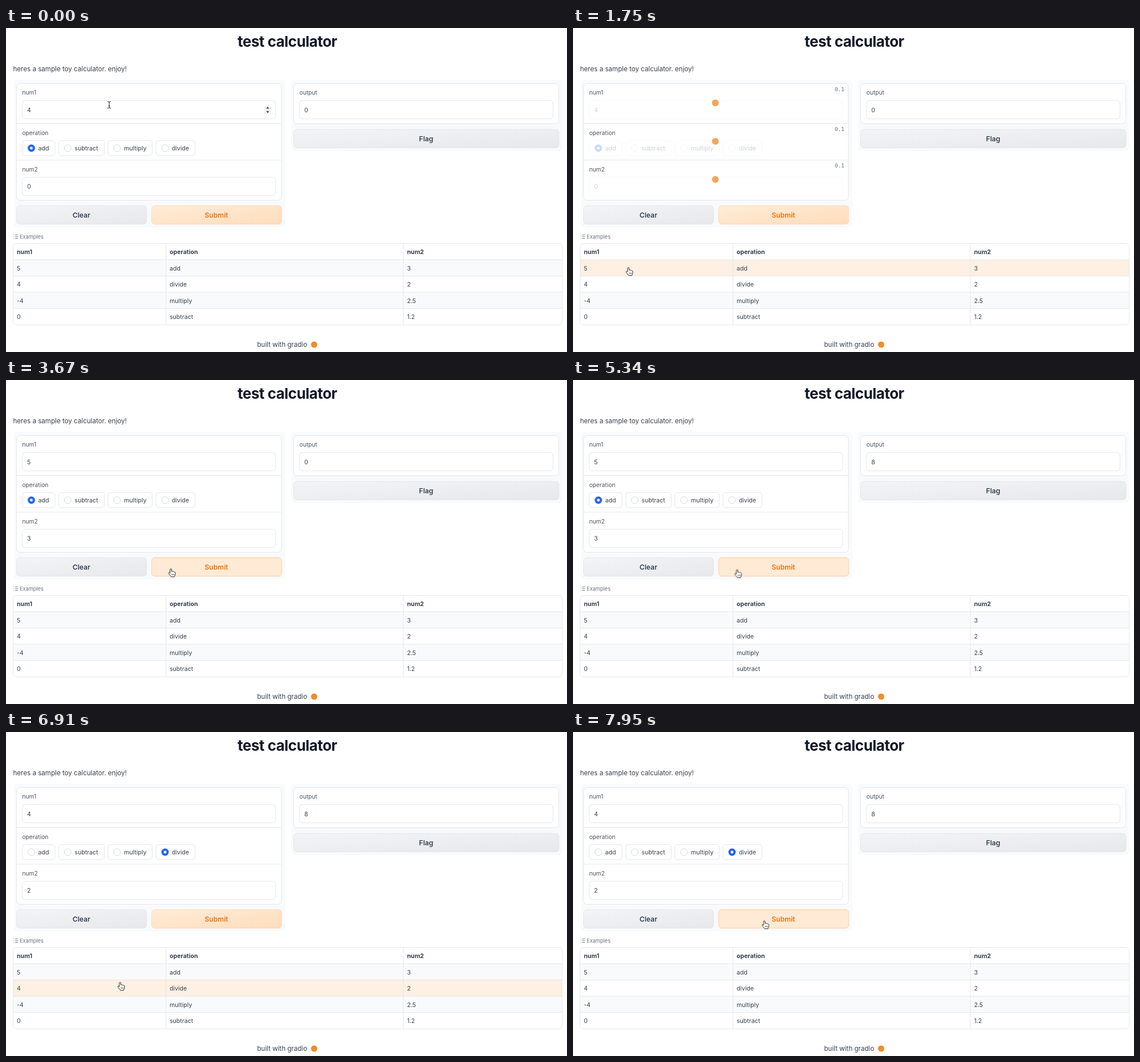
An HTML page that plays this animation: 984 px wide and 569 px high, repeating every 8000 ms.

```html
<!DOCTYPE html>
<html lang="en">
<head>
<meta charset="utf-8">
<title>test calculator</title>
<style>
  @property --tenths { syntax: "<integer>"; inherits: true; initial-value: 0; }

  html, body { margin: 0; width: 100%; height: 100%; overflow: hidden; background: #fff; }
  svg { position: absolute; left: 0; top: 0; display: block; }
  text { font: 10.6px Inter, sans-serif; fill: #374151; }
  .title { font-size: 26px; font-weight: 700; letter-spacing: -.02em; fill: #111827; text-anchor: middle; }
  .intro { font-size: 11.6px; }
  .label text { font-size: 10.2px; fill: #4b5563; }
  .head text { font-weight: 700; }
  .small { font-size: 9.2px; fill: #6b7280; }
  .button { font-size: 12.1px; font-weight: 600; text-anchor: middle; }
  .box { fill: #fff; stroke: #e5e7eb; }
  .line { fill: none; stroke: #e5e7eb; }
  .panel { fill: #f9fafb; }
  .stripe { fill: #f9fafb; }
  .hover { fill: #fef0e2; }
  .mark { fill: #f28c28; }
  .cover { fill: #fff; }

  /* One percent of the loop is 80 ms. */
  .values-a, .values-b, .values-c, .radio-early, .radio-late, .result-a, .result-b,
  .row-1, .row-2, .submit-hover, .stepper, .ibeam, .arrow, .hand {
    animation: 8s step-end infinite;
  }
  .values-a { animation-name: values-a; }
  .values-b { animation-name: values-b; }
  .values-c { animation-name: values-c; }
  .radio-early { animation-name: radio-early; }
  .radio-late { animation-name: values-c; }
  .result-a { animation-name: result-a; }
  .result-b { animation-name: result-b; }
  .row-1 { animation-name: row-1; }
  .row-2 { animation-name: row-2; }
  .submit-hover { animation-name: submit-hover; }
  .stepper, .ibeam { animation-name: in-field; }
  .arrow { animation-name: arrow; }
  .hand { animation-name: hand; }

  @keyframes values-a { 0% { opacity: 1 } 27.4% { opacity: 0 } }
  @keyframes values-b { 0% { opacity: 0 } 27.4% { opacity: 1 } 83.8% { opacity: 0 } }
  @keyframes values-c { 0% { opacity: 0 } 83.8% { opacity: 1 } }
  @keyframes radio-early { 0% { opacity: 1 } 83.8% { opacity: 0 } }
  @keyframes result-a { 0% { opacity: 1 } 52.8% { opacity: 0 } }
  @keyframes result-b { 0% { opacity: 0 } 52.8% { opacity: 1 } }
  @keyframes row-1 {
    0% { opacity: 0 } 6.3% { opacity: 1 } 24.5% { opacity: 0 }
    69.2% { opacity: 1 } 70.2% { opacity: 0 } 87.8% { opacity: 1 } 88.8% { opacity: 0 }
  }
  @keyframes row-2 { 0% { opacity: 0 } 70.2% { opacity: 1 } 87.8% { opacity: 0 } }
  @keyframes submit-hover {
    0% { opacity: 0 } 35.6% { opacity: 1 } 67.8% { opacity: 0 } 92.5% { opacity: 1 }
  }
  @keyframes in-field { 0% { opacity: 1 } 2.8% { opacity: 0 } }
  @keyframes arrow {
    0% { opacity: 0 } 2.8% { opacity: 1 } 6.3% { opacity: 0 }
    24.5% { opacity: 1 } 35.6% { opacity: 0 }
    67.8% { opacity: 1 } 69.2% { opacity: 0 }
    88.8% { opacity: 1 } 92.5% { opacity: 0 }
  }
  @keyframes hand {
    0% { opacity: 0 } 6.3% { opacity: 1 } 24.5% { opacity: 0 }
    35.6% { opacity: 1 } 67.8% { opacity: 0 }
    69.2% { opacity: 1 } 88.8% { opacity: 0 } 92.5% { opacity: 1 }
  }

  .pointer { animation: pointer 8s ease-in-out infinite; }
  @keyframes pointer {
    0%, 1.5% { transform: translate(181px, 135px) }
    7.7%, 20.9% { transform: translate(94px, 422.5px) }
    26.8%, 31% { transform: translate(145px, 397px) }
    37.6%, 45.6% { transform: translate(288px, 331.5px) }
    45.8%, 66.4% { transform: translate(289px, 332px) }
    70.6%, 71.5% { transform: translate(195.5px, 437.5px) }
    73.4%, 87.2% { transform: translate(200px, 440px); animation-timing-function: ease-in }
    89.4% { transform: translate(272px, 385px); animation-timing-function: ease-out }
    95.2%, 99.2% { transform: translate(334.5px, 331.5px) }
    99.3%, 100% { transform: translate(335.5px, 332px) }
  }

  .load-in { animation: load-in 8s linear infinite; }
  .load-out { animation: load-out 8s linear infinite; }
  @keyframes load-in {
    0%, 20.6% { opacity: 0 } 22.3%, 27.4% { opacity: 1 } 29.3% { opacity: 0 }
    79.1% { opacity: 0 } 80.8%, 83.8% { opacity: 1 } 85.6%, 100% { opacity: 0 }
  }
  @keyframes load-out {
    0%, 47.6% { opacity: 0 } 49.4%, 52.8% { opacity: 1 } 54.6%, 100% { opacity: 0 }
  }

  .timer {
    position: absolute; width: 30px; line-height: 12px; text-align: right;
    font-family: "DejaVu Sans Mono", monospace; font-size: 9.4px; color: #374151;
    counter-reset: tenths var(--tenths);
  }
  .timer::before { content: "0." counter(tenths); }
  .timer.load-in { left: 446px; animation: load-in 8s linear infinite, count-in 8s linear infinite; }
  .timer.load-out { left: 932px; animation: load-out 8s linear infinite, count-out 8s linear infinite; }
  @keyframes count-in {
    0%, 20.6% { --tenths: 0 } 26.8%, 79% { --tenths: 5 }
    79.1% { --tenths: 0 } 84.1%, 100% { --tenths: 4 }
  }
  @keyframes count-out { 0%, 47.6% { --tenths: 0 } 52.6%, 100% { --tenths: 4 } }
</style>
</head>
<body>
<svg width="984" height="569" viewBox="0 0 984 569">
  <defs>
    <linearGradient id="gray" x2="1" y2="1"><stop stop-color="#f3f4f6"/><stop offset="1" stop-color="#e6e8eb"/></linearGradient>
    <linearGradient id="orange" x2="1" y2="1"><stop stop-color="#ffedd8"/><stop offset="1" stop-color="#fedcbb"/></linearGradient>
    <clipPath id="table"><rect x="12.5" y="378.5" width="963" height="143" rx="6"/></clipPath>
    <g id="radio"><circle r="6" fill="#fff" stroke="#d5d9df"/></g>
    <g id="checked"><circle r="6.4" fill="#2563eb"/><circle r="2.4" fill="#fff"/></g>
  </defs>

  <text class="title" x="493.5" y="33">test calculator</text>
  <text class="intro" x="12.5" y="75.5">heres a sample toy calculator. enjoy!</text>

  <rect class="panel" x="14" y="91" width="476" height="259" rx="6"/>
  <rect class="panel" x="500" y="91" width="476" height="125" rx="6"/>

  <!-- inputs -->
  <rect class="box" x="18.5" y="97.5" width="464.5" height="205" rx="6"/>
  <path class="line" d="M18.5 167.5H483M18.5 232H483"/>
  <rect class="box" x="28.5" y="127.5" width="444.5" height="32" rx="5.5"/>
  <rect class="box" x="28.5" y="262" width="444.5" height="32" rx="5.5"/>
  <g class="stepper">
    <rect x="453" y="136.5" width="12" height="14.5" rx="2" fill="#f1f1f1"/>
    <path d="M456.3 141.5L459 138.3L461.7 141.5ZM456.3 146L459 149.2L461.7 146Z" fill="#444"/>
  </g>
  <text class="values-a" x="37" y="147.5">4</text>
  <text class="values-b" x="37" y="147.5">5</text>
  <text class="values-c" x="37" y="147.5">4</text>
  <text class="values-a" x="37" y="282">0</text>
  <text class="values-b" x="37" y="282">3</text>
  <text class="values-c" x="37" y="282">2</text>

  <rect class="box" x="28.5" y="197.5" width="57.5" height="26.5" rx="5"/>
  <rect class="box" x="92.5" y="197.5" width="80" height="26.5" rx="5"/>
  <rect class="box" x="178.5" y="197.5" width="78" height="26.5" rx="5"/>
  <rect class="box" x="263" y="197.5" width="68.5" height="26.5" rx="5"/>
  <use href="#radio" x="44.5" y="211"/>
  <use href="#radio" x="108.3" y="211"/>
  <use href="#radio" x="194.7" y="211"/>
  <use href="#radio" x="279" y="211"/>
  <use class="radio-early" href="#checked" x="44.5" y="211"/>
  <use class="radio-late" href="#checked" x="279" y="211"/>
  <text x="56.5" y="214.7">add</text>
  <text x="120.3" y="214.7">subtract</text>
  <text x="207" y="214.7">multiply</text>
  <text x="291" y="214.7">divide</text>

  <g class="load-in">
    <rect class="cover" x="20" y="99" width="461.5" height="67.5"/>
    <rect class="cover" x="20" y="168.5" width="461.5" height="62.5"/>
    <rect class="cover" x="20" y="233" width="461.5" height="68"/>
    <circle class="mark" cx="249.7" cy="131.5" r="6"/>
    <circle class="mark" cx="249.7" cy="199" r="6"/>
    <circle class="mark" cx="249.7" cy="266" r="6"/>
  </g>

  <rect x="18.5" y="312" width="228" height="32.5" rx="5.5" fill="url(#gray)" stroke="#e5e7eb"/>
  <text class="button" x="132.3" y="332.5">Clear</text>
  <rect x="255.5" y="312" width="228" height="32.5" rx="5.5" fill="url(#orange)" stroke="#fedbb5"/>
  <rect class="submit-hover" x="255.5" y="312" width="228" height="32.5" rx="5.5" fill="#feead5" stroke="#fdd3a6"/>
  <text class="button" x="369" y="332.5" style="fill:#e17716">Submit</text>

  <!-- output -->
  <rect class="box" x="504.5" y="97.5" width="465" height="70.5" rx="6"/>
  <rect class="box" x="514.5" y="127.5" width="445" height="32" rx="5.5"/>
  <text class="result-a" x="523.3" y="147.5">0</text>
  <text class="result-b" x="523.3" y="147.5">8</text>
  <g class="load-out">
    <rect class="cover" x="506" y="99" width="462" height="67.5"/>
    <circle class="mark" cx="737" cy="131.5" r="6"/>
  </g>
  <rect x="504.5" y="178" width="465.5" height="32.5" rx="5.5" fill="url(#gray)" stroke="#e5e7eb"/>
  <text class="button" x="737" y="198.5">Flag</text>

  <g class="label">
    <text x="28.5" y="117.3">num1</text>
    <text x="28.5" y="187.5">operation</text>
    <text x="28.5" y="251.5">num2</text>
    <text x="514.8" y="117.3">output</text>
  </g>

  <!-- examples -->
  <path d="M13.5 363.5h1M16 363.5h5M13.5 366.5h1M16 366.5h5M13.5 369.5h1M16 369.5h5" stroke="#6b7280" stroke-width=".9"/>
  <text class="small" x="24" y="369.7">Examples</text>
  <g clip-path="url(#table)">
    <rect class="stripe" x="12" y="407" width="964" height="28.5"/>
    <rect class="stripe" x="12" y="464" width="964" height="28.5"/>
    <rect class="hover row-1" x="12" y="407" width="964" height="28.5"/>
    <rect class="hover row-2" x="12" y="435.5" width="964" height="28.5"/>
  </g>
  <path class="line" d="M12.5 407H975.5M12.5 435.5H975.5M12.5 464H975.5M12.5 492.5H975.5M280.5 378.5V521.5M697 378.5V521.5"/>
  <rect class="line" x="12.5" y="378.5" width="963" height="143" rx="6"/>
  <g class="head"><text x="19" y="396.8">num1</text><text x="287" y="396.8">operation</text><text x="703.5" y="396.8">num2</text></g>
  <text x="19" y="425.5">5</text><text x="287" y="425.5">add</text><text x="703.5" y="425.5">3</text>
  <text x="19" y="454">4</text><text x="287" y="454">divide</text><text x="703.5" y="454">2</text>
  <text x="19" y="482.5">-4</text><text x="287" y="482.5">multiply</text><text x="703.5" y="482.5">2.5</text>
  <text x="19" y="511">0</text><text x="287" y="511">subtract</text><text x="703.5" y="511">1.2</text>

  <text class="intro" x="440.5" y="560">built with gradio</text>
  <circle class="mark" cx="540.5" cy="556" r="5.5"/>

  <g class="pointer">
    <path class="ibeam" d="M-3 -6Q0 -6 0 -4V4Q0 6 -3 6M3 -6Q0 -6 0 -4M0 4Q0 6 3 6M-1.5 2H1.5" fill="none" stroke="#222"/>
    <path class="arrow" d="M0 0V11L2.5 8.8L4.2 12.7L6 11.9L4.4 8.1L7.6 8Z" fill="#000" stroke="#fff" stroke-width=".8" paint-order="stroke"/>
    <g class="hand" stroke="#222" stroke-linejoin="round">
      <path d="M-1.2 1C-1.2 -.8 1.4 -.8 1.4 1V4.2C2 3.4 3.6 3.6 3.8 4.6C4.6 4 5.9 4.3 6 5.3C7 5 8 5.5 8 6.8L7.6 10C7.3 12 6.6 12 6.5 13.6H.5C.3 12.3 -2.5 10 -3.8 7.6C-4.4 6.4 -2.8 5.6 -1.9 6.6L-1.2 7.4Z" fill="#fff"/>
      <path d="M1.8 8.5V11M3.6 8.5V11M5.4 8.5V11" fill="none" stroke-width=".7"/>
    </g>
  </g>
</svg>
<div class="timer load-in" style="top:101.5px"></div>
<div class="timer load-in" style="top:172px"></div>
<div class="timer load-in" style="top:236px"></div>
<div class="timer load-out" style="top:101.5px"></div>
</body>
</html>
```
